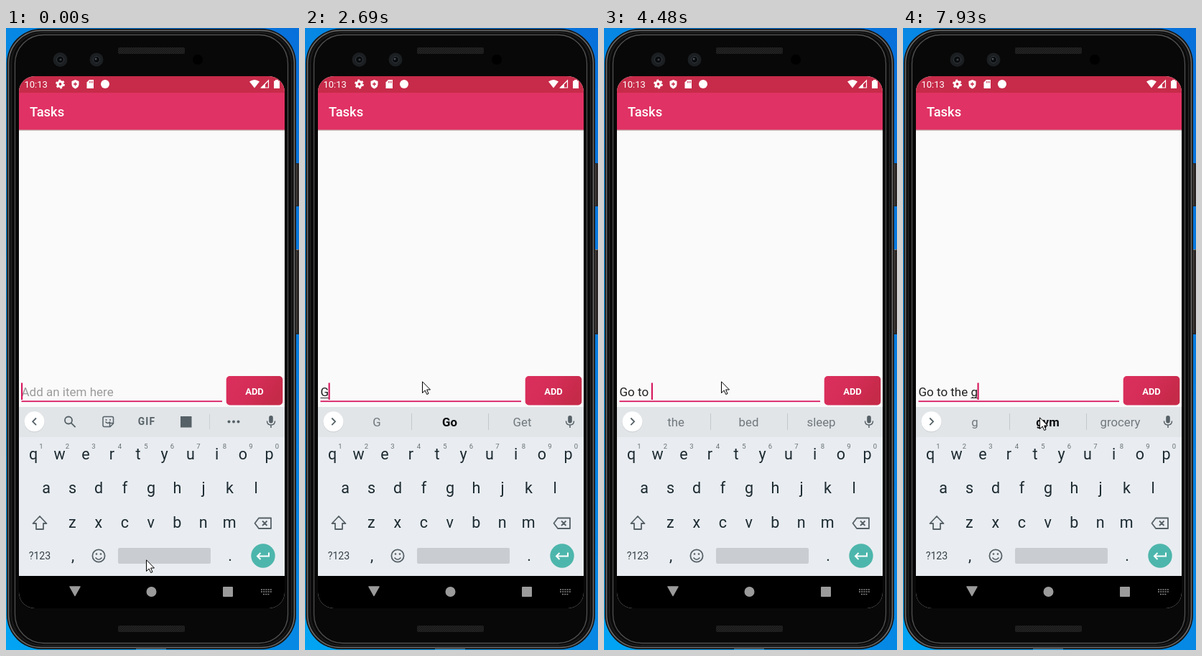
An HTML page that plays this animation: 408 px wide and 865 px high, repeating every 8 s.

```html
<!DOCTYPE html>
<html lang="en">
<head>
<meta charset="utf-8">
<title>Tasks</title>
<style>
  html, body { margin: 0; width: 100%; height: 100%; overflow: hidden; background: #0078d7; }
  svg { display: block; width: 408px; height: 865px; }
  text { font-family: Roboto, "Liberation Sans", sans-serif; white-space: pre; }
  .mid { text-anchor: middle; }
  .key { font-size: 21.5px; fill: #1c2a31; }
  .small { font-size: 9.5px; fill: #667075; }
  .word { font-size: 16.8px; fill: #70787d; }
  .bold { font-weight: 700; fill: #0a0c0d; }
  .field { font-size: 17px; }
  .line { fill: none; stroke: #566167; stroke-width: 1.8; }
  .thin { stroke-width: 1.5; }
  .solid { fill: #566167; }
</style>
</head>
<body>
<svg viewBox="0 0 408 865">
  <defs>
    <linearGradient id="sky" x1="0" y1="1" x2="1" y2="0">
      <stop offset="0" stop-color="#02a4f3"/><stop offset=".5" stop-color="#0688e4"/><stop offset="1" stop-color="#0870da"/>
    </linearGradient>
    <linearGradient id="button" y2=".35">
      <stop offset="0" stop-color="#db2f5d"/><stop offset=".55" stop-color="#d42d57"/><stop offset="1" stop-color="#c62a49"/>
    </linearGradient>
    <pattern id="mesh" width="3" height="3" patternUnits="userSpaceOnUse">
      <rect width="3" height="3" fill="#242424"/><path d="M0 3L3 0" stroke="#131313"/>
    </pattern>
    <clipPath id="screen"><rect x="18" y="67" width="370" height="740" rx="22"/></clipPath>
  </defs>

  <!-- phone body -->
  <rect width="408" height="865" fill="url(#sky)"/>
  <rect x="403" y="188" width="5" height="60" fill="#292625"/>
  <rect x="403" y="308" width="5" height="118" fill="#292625"/>
  <path d="M404.5 189v58M404.5 310v114" stroke="#4f4743"/>
  <path d="M403.5 308.5h4" stroke="#8a8078"/>
  <rect x="1" y="1" width="403" height="863" rx="48" fill="#161616"/>
  <rect x="3.5" y="3.5" width="398" height="858" rx="46" fill="#101010" stroke="#6a6a6a" stroke-width="1.6"/>
  <rect x="7.5" y="6.5" width="390" height="852" rx="43" fill="#0a0a0a" stroke="#262626"/>
  <rect x="12.5" y="9.5" width="380" height="846" rx="40" fill="#080808" stroke="#505050" stroke-width="1.3"/>
  <path d="M181 863.5h42" stroke="#777"/>
  <rect x="156" y="27" width="93" height="9" rx="2" fill="url(#mesh)"/>
  <rect x="156" y="831" width="93" height="9" rx="2" fill="url(#mesh)"/>
  <g fill="#1c1f22">
    <circle cx="75.5" cy="44" r="10"/><circle cx="126" cy="44" r="9.5"/>
    <g fill="#090b0d" stroke="#343a40"><circle cx="75.5" cy="44" r="5"/><circle cx="126" cy="44" r="4.5"/></g>
    <circle cx="76" cy="44" r="1.6" fill="#3b4148"/><circle cx="125" cy="43" r="1.5" fill="#4a525a"/>
    <circle cx="267" cy="44" r="7" fill="#000"/>
  </g>

  <g clip-path="url(#screen)">
    <rect x="18" y="67" width="370" height="740" fill="#fafafa"/>
    <rect x="18" y="67" width="370" height="23" fill="#c72b49"/>
    <rect x="18" y="90" width="370" height="51" fill="#e03264"/>
    <rect x="18" y="141" width="370" height="1" fill="#cf6d87"/>
    <rect x="18" y="142" width="370" height="1" fill="#cfc8c6"/>

    <!-- status bar -->
    <g fill="#fff">
      <text x="25.5" y="83" font-size="13">10:13</text>
      <circle cx="75.5" cy="78" r="3.4" fill="none" stroke="#fff" stroke-width="3"/>
      <circle cx="75.5" cy="78" r="5.4" fill="none" stroke="#fff" stroke-width="2" stroke-dasharray="2.8 2.85"/>
      <path d="M96.5 72l5 2v4q0 4.5-5 6.5q-5-2-5-6.5v-4z"/>
      <path d="M96.5 75.5v5M94 78h5" stroke="#c72b49" stroke-width="1.4"/>
      <path d="M116 72h6v12h-9.5v-8.5z"/>
      <path d="M116.5 74v2.5M118.5 74v2.5M120.5 74v2.5" stroke="#c72b49" stroke-width=".9"/>
      <circle cx="138" cy="78" r="6"/>
      <path d="M339 74.5q7-5 14 0l-7 9z"/>
      <path d="M365.5 73v10h-10z" fill="none" stroke="#fff" stroke-width="1.2"/>
      <path d="M355 83.5l6-6v6z"/>
      <path d="M373 73.5h2v-1.5h4v1.5h2v10.5h-8z"/>
    </g>
    <text x="33" y="123.3" font-size="18.4" font-weight="500" fill="#fff">Tasks</text>

    <!-- entry row -->
    <text id="entry" class="field" x="21.5" y="512"></text>
    <rect id="under" y="514" height="1" fill="#333"/>
    <rect x="21.5" y="518.3" width="279.5" height="1.8" fill="#d81b60"/>
    <rect id="caret" y="493.5" width="2.2" height="23.5" fill="#d81b60"/>
    <rect x="306.7" y="484" width="78.6" height="40.5" rx="5" fill="url(#button)"/>
    <text class="mid" x="346" y="509.5" font-size="13" font-weight="700" fill="#fff">ADD</text>

    <!-- keyboard -->
    <rect x="18" y="527" width="370" height="235" fill="#e9edf1"/>
    <rect x="18" y="527" width="370" height="42" fill="#e1e5e8"/>
    <circle cx="39.5" cy="548" r="14.3" fill="#cbd0d3"/>
    <circle cx="39.5" cy="547.3" r="14" fill="#fff"/>
    <path id="chevron" class="line"/>
    <rect class="solid" x="366.2" y="539" width="5.6" height="10.5" rx="2.8"/>
    <path class="line thin" d="M363.5 546.5q0 5.5 5.5 5.5t5.5-5.5M369 552v4"/>
    <g id="tools">
      <circle class="line" cx="87" cy="545.5" r="5"/>
      <path class="line" d="M90.6 549.1l6 6"/>
      <path class="line thin" d="M137 540.5h10.5q2 0 2 2v7.5l-4.5 4.5h-8q-2 0-2-2v-10q0-2 2-2zM149 549.5h-4.5v4.5M138.500 547.5q3.500 4 6.500 0"/>
      <g class="solid"><circle cx="139.5" cy="545" r="1.1"/><circle cx="145" cy="545" r="1.1"/></g>
      <text class="mid solid" x="196" y="552" font-size="13.8" font-weight="700" letter-spacing="1.2">GIF</text>
      <rect class="solid" x="243" y="540" width="15.5" height="15.5"/>
      <path d="M283.5 537v21" stroke="#cbd0d3"/>
      <g class="solid"><circle cx="310.5" cy="547.5" r="2"/><circle cx="317" cy="547.5" r="2"/><circle cx="323.5" cy="547.5" r="2"/></g>
    </g>
    <g id="words"><path d="M148.5 536v23M255.5 536v23" stroke="#c3c8cb"/></g>
    <g id="keys"></g>
    <path id="shift" class="line" stroke-linejoin="round" d="M47 679l9.5 10h-4.5v8h-10v-8h-4.5z"/>
    <path class="line" stroke-linejoin="round" d="M352 681.5h17v14.500h-17l-5.500-7.250zM357 685.500l6.500 6.500M363.500 685.500l-6.500 6.500"/>
    <text class="mid" x="47" y="739" font-size="14.2" fill="#364248">?123</text>
    <text class="mid key" x="93" y="741">,</text>
    <text class="mid key" x="312" y="741">.</text>
    <circle class="line" cx="129" cy="734" r="8.6"/>
    <path class="line thin" d="M124.5 736.5q4.5 5.5 9 0"/>
    <g class="solid"><circle cx="126" cy="731.5" r="1.3"/><circle cx="132" cy="731.5" r="1.3"/></g>
    <rect x="156" y="723" width="129" height="22" rx="2" fill="#c9cdd1"/>
    <circle cx="358" cy="734" r="16.7" fill="#4db6ac"/>
    <path d="M366 729.5v5h-15.5M354.5 730l-4.5 4.5l4.5 4.5" fill="none" stroke="#fff" stroke-width="2"/>

    <!-- navigation bar -->
    <rect x="18" y="762" width="370" height="45" fill="#000"/>
    <g fill="#9b9b9b">
      <path d="M89 777h14l-7 12.5z" stroke="#9b9b9b" stroke-width="1.5" stroke-linejoin="round"/>
      <circle cx="202.5" cy="784" r="7"/>
      <rect x="302" y="777" width="14" height="14" rx="1"/>
      <path d="M355 781h15M355 784h15M358 787.5h9" stroke="#8a8a8a" stroke-width="1.7" stroke-dasharray="2 1.2"/>
    </g>
  </g>
  <path id="pointer" d="M.5 .8V16.5L4.2 13L6.7 18.5L9 17.5L6.6 12H11.5z" fill="#fff" stroke="#000"/>
</svg>
<script>
const LOOP = 8000;
const $ = id => document.getElementById(id);

// time, typed text, caret shown, suggestions ("*" marks bold)
const TYPING = [
  [0, "", 1], [120, "", 0], [630, "", 1], [1180, "", 0], [1580, "", 1],
  [2140, "", 0], [2540, "", 1],
  [2690, "G", 1, "G,*Go,Get"],
  [2970, "Go", 1, "Go,Good,Got"],
  [3250, "Go ", 1, "to,and,back"],
  [3800, "Go t", 1, "t,*to,through"],
  [4200, "Go to", 1, "to,To,too"],
  [4480, "Go to ", 1, "the,bed,sleep"],
  [4750, "Go to t", 1, "t,*the,they"],
  [5000, "Go to th", 1, "th,*the,they"],
  [5280, "Go to the", 1, "the,The,the church"],
  [5560, "Go to the ", 1, "gym,store,beach"],
  [5970, "Go to the ", 0, "gym,store,beach"],
  [6510, "Go to the g", 1, "g,*gym,grocery"],
  [7040, "Go to the g", 0, "g,*gym,grocery"],
  [7470, "Go to the g", 1, "g,*gym,grocery"]
];
// time, x, y
const POINTER = [
  [0, 195, 739], [120, 193, 738], [240, 190, 736], [390, 188, 686], [510, 183, 618],
  [630, 176, 556], [750, 168, 511], [870, 163, 491], [7780, 177, 511], [7930, 190, 541]
];
const SHIFT = [2540, 2690];

function addText(parent, x, y, cls, value = "") {
  const el = document.createElementNS("http://www.w3.org/2000/svg", "text");
  el.setAttribute("x", x);
  el.setAttribute("y", y);
  el.setAttribute("class", "mid " + cls);
  el.textContent = value;
  parent.append(el);
  return el;
}

const letters = [];
[["qwertyuiop", 38, 600], ["asdfghjkl", 56, 647], ["zxcvbnm", 92.3, 694.5]].forEach(([row, x0, y], r) =>
  [...row].forEach((ch, i) => {
    const x = x0 + i * 36.5;
    letters.push([addText($("keys"), x, y, "key", ch), ch]);
    if (r === 0) addText($("keys"), x + 11, 584.5, "small", (i + 1) % 10);
  }));
const words = [100, 201.5, 302.5].map(x => addText($("words"), x, 554, "word"));

const pen = document.createElement("canvas").getContext("2d");
pen.font = '17px Roboto, "Liberation Sans", sans-serif';
const widthOf = s => pen.measureText(s).width;
const at = (table, t) => table.findLast(row => row[0] <= t);

function showTyping([, text, caret, list]) {
  $("entry").textContent = text || "Add an item here";
  $("entry").setAttribute("fill", text ? "#212121" : "#9b9b9b");
  const end = widthOf(text), start = widthOf(text.slice(0, text.lastIndexOf(" ") + 1));
  $("under").setAttribute("x", 21.5 + start);
  $("under").setAttribute("width", end - start);
  $("caret").setAttribute("x", 21 + end);
  $("caret").style.opacity = caret;
  $("tools").style.display = list ? "none" : "";
  $("words").style.display = list ? "" : "none";
  $("chevron").setAttribute("d", list ? "M37.3 542.5l4.8 4.8l-4.8 4.8" : "M42 542.5l-4.8 4.8l4.8 4.8");
  if (list) list.split(",").forEach((w, i) => {
    words[i].textContent = w.replace("*", "");
    words[i].classList.toggle("bold", w[0] === "*");
  });
}

function showShift(on) {
  letters.forEach(([el, ch]) => el.textContent = on ? ch.toUpperCase() : ch);
  $("shift").style.fill = on ? "#566167" : "none";
}

let typed, shifted;
function draw() {
  const t = performance.now() % LOOP;
  const step = at(TYPING, t), shift = t >= SHIFT[0] && t < SHIFT[1];
  if (step !== typed) showTyping(typed = step);
  if (shift !== shifted) showShift(shifted = shift);
  const [, x, y] = at(POINTER, t);
  $("pointer").setAttribute("transform", `translate(${x} ${y})`);
  requestAnimationFrame(draw);
}
draw();
</script>
</body>
</html>
```
